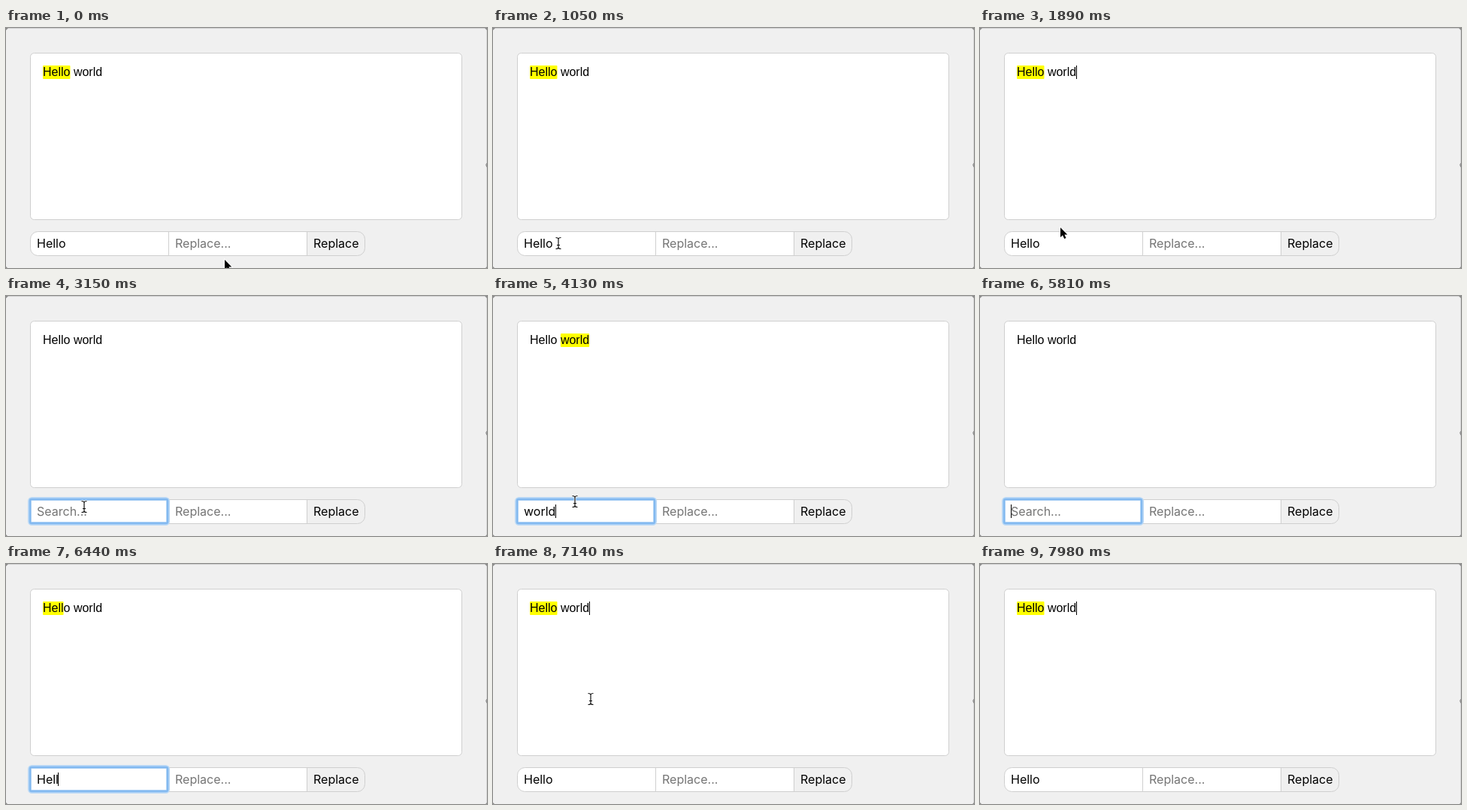
An HTML page that plays this animation: 640x320 px, repeating every 8000 ms.

```html
<!DOCTYPE html>
<html lang="en">
<head>
<meta charset="utf-8">
<title>Search and replace</title>
<style>
  html, body { margin: 0; width: 100%; height: 100%; overflow: hidden; background: #f0f0f0; }
  svg { display: block; width: 100%; height: 100%; }
  text { font-size: 16px; white-space: pre; }
  .doc { font-family: "Liberation Sans", Arial, sans-serif; }
  .ui { font-family: Inter, sans-serif; }
  .hint { fill: #757575; }
  .line { fill: none; stroke: #cfcfcf; }
</style>
</head>
<body>
<svg viewBox="0 0 640 320" xmlns="http://www.w3.org/2000/svg">
  <rect width="640" height="320" fill="#f0f0f0"/>
  <path d="M0 .5H640" stroke="#d2d2d2"/>
  <path d="M639.5 0V320" stroke="#d6d6d6"/>
  <path d="M0 0H3L0 3ZM640 0H637L640 3ZM0 320V318L2 320ZM640 320V318L638 320Z" fill="#8a8a8a"/>
  <path d="M640 180.5Q638.5 181 639 183T640 185.5" fill="none" stroke="#666"/>

  <rect x="32.5" y="33.5" width="574" height="222" rx="5" fill="#fff" stroke="#cfcfcf"/>
  <rect id="mark" y="50" height="18" rx="1" fill="#ff0"/>
  <text id="doc" class="doc" x="49" y="64">Hello world</text>
  <path id="docCaret" d="M128.5 50V68" stroke="#000"/>

  <path d="M400.5 271.5H42.5A10 10 0 0 0 32.5 281.5V293.5A10 10 0 0 0 42.5 303.5H400.5Z" fill="#fff"/>
  <rect class="line" x="32.5" y="271.5" width="445" height="32" rx="10"/>
  <path class="line" d="M216.5 271.5V303.5M400.5 271.5V303.5"/>
  <g id="ring">
    <rect x="31.5" y="270.5" width="184" height="33" rx="3" fill="#fff" stroke="#b9d8f6" stroke-width="5"/>
    <rect x="32" y="271" width="183" height="32" rx="2" fill="none" stroke="#83b9f0" stroke-width="2.4"/>
  </g>
  <text id="query" class="ui" x="41" y="293"></text>
  <text class="ui hint" x="225" y="293">Replace...</text>
  <text class="ui" x="409" y="293">Replace</text>
  <path id="queryCaret" d="M0 278V296" stroke="#000"/>

  <path id="arrow" d="M0 0V13L3 10.3L5.2 15L7.5 14L5.4 9.4H9.3Z" stroke="#fff" stroke-width="1.6" paint-order="stroke"/>
  <g id="beam" fill="none">
    <path d="M-3.5 -7.5Q0 -7.5 0 -5.5Q0 -7.5 3.5 -7.5M0 -6V6M-3.5 7.5Q0 7.5 0 5.5Q0 7.5 3.5 7.5M-2 2.5H2" stroke="#fff" stroke-width="2.6"/>
    <path d="M-3.5 -7.5Q0 -7.5 0 -5.5Q0 -7.5 3.5 -7.5M0 -6V6M-3.5 7.5Q0 7.5 0 5.5Q0 7.5 3.5 7.5M-2 2.5H2" stroke="#111" stroke-width="1.2"/>
  </g>
</svg>
<script>
const LOOP = 8000, TICK = 70;
const $ = id => document.getElementById(id);
const docText = $('doc'), query = $('query');

// Pointer stops: [time, x, y]
const path = [
  [0, 291, 309], [350, 239, 131], [490, 239, 131], [770, 87, 286], [1050, 87, 287],
  [1400, 157, 280], [1540, 157, 280], [1890, 107, 266], [2030, 107, 266], [2170, 104, 281],
  [4060, 104, 281], [4480, 170, 192], [4690, 170, 192], [5180, 182, 183], [5530, 38, 288],
  [6790, 38, 288], [7000, 130, 180]
];
const hidden = [[3220, 4130], [5670, 6860], [7420, LOOP]];

// Contents of the search field: [time, text]
const typed = [
  [0, 'Hello'], [2660, ''], [3220, 'w'], [3500, 'wo'], [3640, 'wor'], [3780, 'worl'], [3920, 'world'],
  [5670, ''], [5950, 'H'], [6230, 'He'], [6370, 'Hel'], [6440, 'Hell'], [6580, 'Hello']
];
const focusSpan = [2170, 7000];
const docCaretOn = [[350, 910], [1400, 1960], [7000, 7490], [7980, LOOP]];

const within = (t, spans) => spans.some(([a, b]) => t >= a && t < b);
const show = (el, on) => el.setAttribute('visibility', on ? 'visible' : 'hidden');
const move = (el, x, y = 0) => el.setAttribute('transform', `translate(${x} ${y})`);
const widthOf = (el, n) => n ? el.getSubStringLength(0, n) : 0;

function pointerAt(t) {
  const i = path.findIndex(p => p[0] > t);
  if (i < 0) return path[path.length - 1].slice(1);
  const [t0, x0, y0] = path[i - 1], [t1, x1, y1] = path[i];
  const k = (t - t0) / (t1 - t0), e = k * k * (3 - 2 * k);
  return [x0 + (x1 - x0) * e, y0 + (y1 - y0) * e];
}

function drawPointer(t) {
  const [x, y] = pointerAt(t);
  const overText = (x > 32 && x < 607 && y > 33 && y < 256) || (x > 32 && x < 400 && y > 271 && y < 304);
  const visible = !within(t, hidden);
  show($('beam'), visible && overText);
  show($('arrow'), visible && !overText);
  move($('beam'), Math.round(x), Math.round(y));
  move($('arrow'), Math.round(x), Math.round(y));
}

function drawText(t) {
  const [since, value] = typed.filter(s => s[0] <= t).pop();
  query.textContent = value || 'Search...';
  query.classList.toggle('hint', !value);

  const start = docText.textContent.indexOf(value);
  const left = widthOf(docText, start);
  $('mark').setAttribute('x', 49 + left);
  $('mark').setAttribute('width', value ? widthOf(docText, start + value.length) - left : 0);

  const focused = within(t, [focusSpan]);
  const blink = Math.floor((t - Math.max(since, focusSpan[0])) / 490) % 2 === 0;
  show($('ring'), focused);
  show($('queryCaret'), focused && blink);
  move($('queryCaret'), Math.floor(41 + widthOf(query, value.length)) + 0.5);
  show($('docCaret'), within(t, docCaretOn));
}

function render(ms) {
  const t = Math.floor(ms % LOOP / TICK) * TICK;
  drawText(t);
  drawPointer(t);
}

const begin = performance.now();
function loop() {
  render(performance.now() - begin);
  requestAnimationFrame(loop);
}
loop();
</script>
</body>
</html>
```
